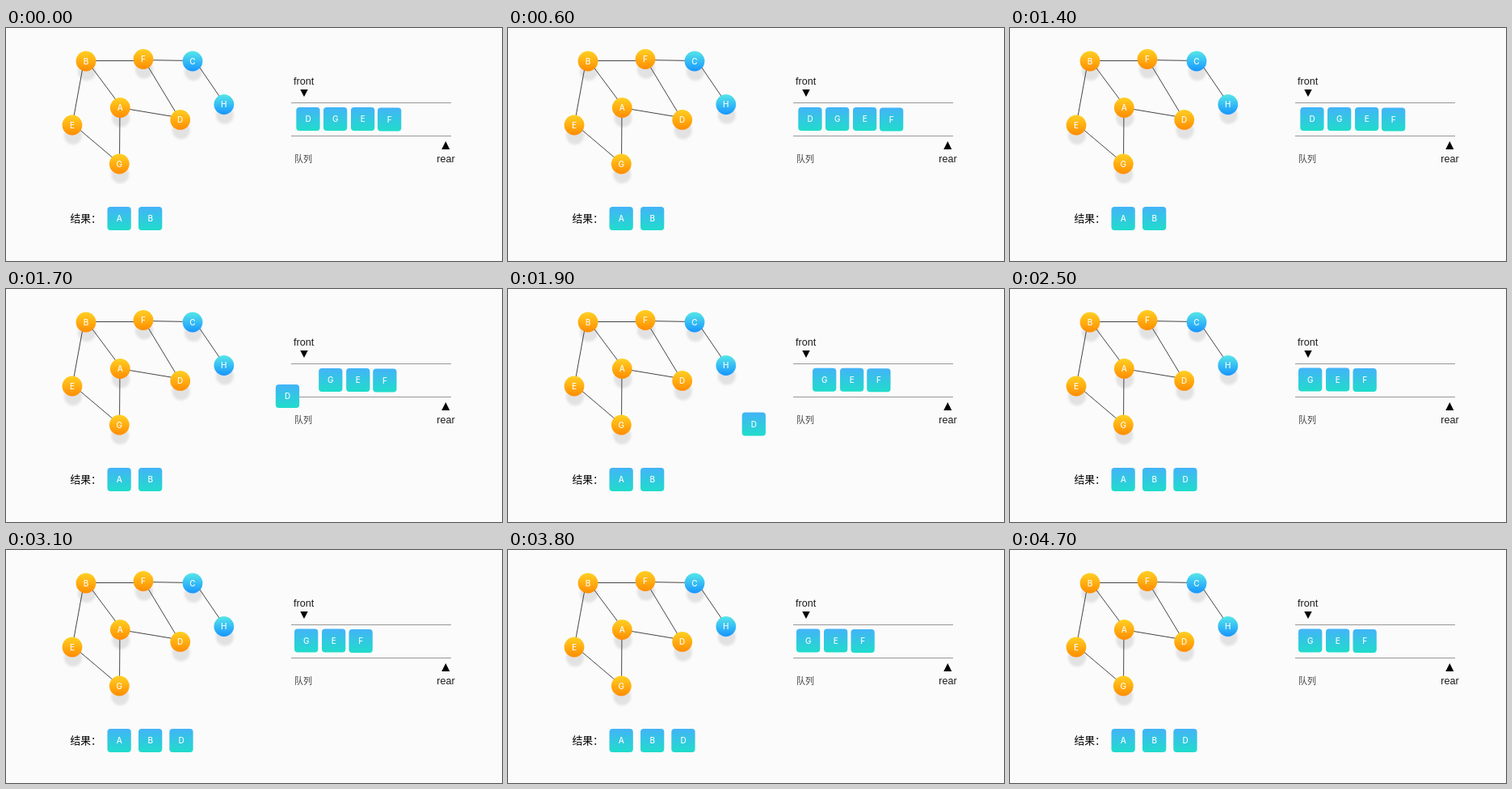
These frames come from a looping animation (614 by 288 pixels, 4.8 s). An HTML page:

```html
<!DOCTYPE html>
<html lang="zh-CN">
<head>
<meta charset="utf-8">
<style>
html, body { margin: 0; width: 100%; height: 100%; overflow: hidden; background: #fbfbfb; }
svg { display: block; }
text { font-family: "Liberation Sans", Arial, sans-serif; font-size: 12.6px; fill: #1c1c1c; }
.cjk { font-family: "Noto Sans CJK SC", "Noto Sans CJK", sans-serif; }
.letter { font: 500 10px Inter, sans-serif; fill: #fff; fill-opacity: .95; text-anchor: middle; }
</style>
</head>
<body>
<svg width="614" height="288" viewBox="0 0 614 288">
  <defs>
    <linearGradient id="seen" x2="0" y2="1"><stop stop-color="#ffd023"/><stop offset="1" stop-color="#ff8c00"/></linearGradient>
    <linearGradient id="fresh" x2="0" y2="1"><stop stop-color="#55e6e8"/><stop offset="1" stop-color="#1795ff"/></linearGradient>
    <linearGradient id="tile" x2="0" y2="1"><stop stop-color="#43b3f8"/><stop offset="1" stop-color="#20dccb"/></linearGradient>
    <filter id="soft" x="-50%" y="-50%" width="200%" height="200%"><feGaussianBlur stdDeviation="1.4"/></filter>
  </defs>
  <g id="shadows" fill="#e2e2e2" filter="url(#soft)"></g>
  <g id="edges" stroke="#454545"></g>
  <g id="nodes"></g>
  <path d="M353 92.5H551M353 133.5H551" stroke="#979797"/>
  <path d="M364.3 76h9.4l-4.7 9zM539.3 150h10l-5-10z" fill="#000"/>
  <text x="356" y="70">front</text>
  <text x="533.3" y="166.4">rear</text>
  <text class="cjk" x="357" y="166" style="font-size:11px;fill:#444">队列</text>
  <text class="cjk" x="79.5" y="239.6" style="font-size:12.8px;fill:#000">结果：</text>
  <g id="tiles"></g>
</svg>
<script>
const LOOP = 4800, STEP = 100, START = 1436, DURATION = 1000;
const nodes = {
  A: [141.3, 98.5], B: [99, 41], C: [231, 41], D: [215.7, 113.4],
  E: [82, 120], F: [170, 38.5], G: [140.3, 168], H: [269.8, 94.5]
};
// x1, y1, x2, y2
const edges = [
  [99, 40.5, 170, 40.5], [170, 39.5, 231, 40.5], [231, 36, 270, 93],
  [96.5, 41, 82, 120], [99, 39, 143, 98], [170, 38, 216, 114],
  [141, 98.5, 216, 111], [141, 98, 140.5, 168], [82, 118, 140, 167]
];
// letter, start x, start y, end x, end y
const tiles = [
  ["A", 125.5, 221, 125.5, 221], ["B", 164, 221, 164, 221],
  ["G", 393, 98, 357, 97.5], ["E", 427, 98, 391, 97.5],
  ["F", 460, 98.5, 424.5, 98], ["D", 359.3, 98, 202.3, 221]
];

function add(parent, tag, attrs, text = "") {
  const el = document.createElementNS("http://www.w3.org/2000/svg", tag);
  for (const key in attrs) el.setAttribute(key, attrs[key]);
  el.textContent = text;
  return parent.appendChild(el);
}
const group = id => document.getElementById(id);

for (const [x1, y1, x2, y2] of edges)
  add(group("edges"), "line", { x1, y1, x2, y2 });

for (const [name, [cx, cy]] of Object.entries(nodes)) {
  const fill = "CH".includes(name) ? "url(#fresh)" : "url(#seen)";
  add(group("shadows"), "ellipse", { cx: cx + 1, cy: cy + 13, rx: 11, ry: 11 });
  add(group("nodes"), "circle", { cx, cy, r: 12.4, fill });
  add(group("nodes"), "text", { x: cx, y: cy + 3.6, class: "letter" }, name);
}
const movers = tiles.map(([name, ...path]) => {
  const el = add(group("tiles"), "g", {});
  add(el, "rect", { width: 29.3, height: 29, rx: 4, fill: "url(#tile)" });
  add(el, "text", { x: 14.7, y: 18.1, class: "letter" }, name);
  return { el, path };
});

function draw(now) {
  const time = Math.floor(now % LOOP / STEP) * STEP;
  const u = Math.min(1, Math.max(0, (time - START) / DURATION));
  const p = (1 - Math.cos(Math.PI * u)) / 2;
  for (const { el, path: [x1, y1, x2, y2] } of movers)
    el.setAttribute("transform", `translate(${x1 + (x2 - x1) * p} ${y1 + (y2 - y1) * p})`);
}

const begin = performance.now();
function tick() {
  draw(performance.now() - begin);
  requestAnimationFrame(tick);
}
tick();
</script>
</body>
</html>
```
